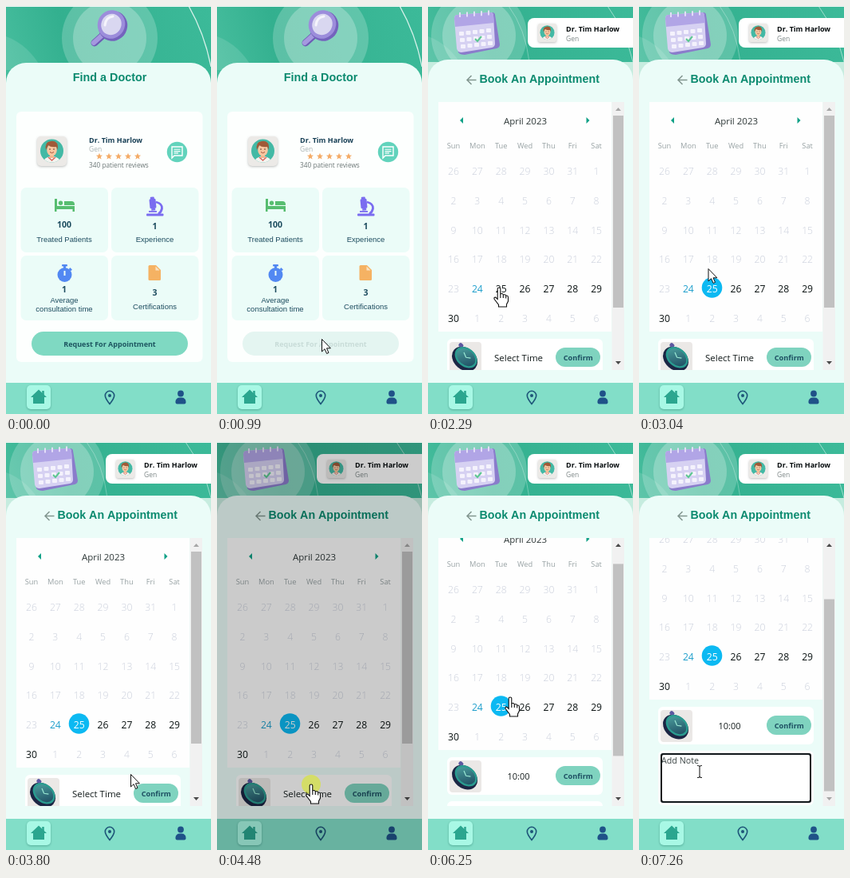
An HTML page with a canvas that plays this animation: 257x510 px, repeating every 8 s.

```html
<!DOCTYPE html>
<html lang="en">
<head>
<meta charset="utf-8">
<title>Doctor appointment</title>
<style>
html, body { margin: 0; width: 100%; height: 100%; overflow: hidden; background: #ebfcf8; }
canvas { display: block; width: 257px; height: 510px; }
</style>
</head>
<body>
<canvas id="stage"></canvas>
<script>
const W = 257, H = 510, LOOP = 8000;
const canvas = document.getElementById('stage');
const dpr = window.devicePixelRatio || 1;
canvas.width = W * dpr;
canvas.height = H * dpr;
const c = canvas.getContext('2d');

const SANS = '"Open Sans", "Noto Sans", sans-serif';
const ARIAL = '"Liberation Sans", Arial, sans-serif';
const MINT = '#ebfcf8', INK = '#1d4c5f', TEAL = '#0b8a6f';
const DOCTOR = 'Dr. Tim Harlow';

// ---- drawing helpers ----
function box(x, y, w, h, r, fill) {
  c.beginPath();
  c.roundRect(x, y, w, h, r);
  c.fillStyle = fill;
  c.fill();
}
function disc(x, y, r, fill) {
  c.beginPath();
  c.arc(x, y, r, 0, Math.PI * 2);
  c.fillStyle = fill;
  c.fill();
}
function oval(x, y, rx, ry, turn, fill) {
  c.beginPath();
  c.ellipse(x, y, rx, ry, turn, 0, Math.PI * 2);
  c.fillStyle = fill;
  c.fill();
}
function shape(d, fill, stroke, width = 1) {
  const p = new Path2D(d);
  if (fill) { c.fillStyle = fill; c.fill(p); }
  if (stroke) { c.strokeStyle = stroke; c.lineWidth = width; c.stroke(p); }
}
function text(s, x, y, font, fill, align = 'center') {
  c.font = font;
  c.textAlign = align;
  c.fillStyle = fill;
  c.fillText(s, x, y);
}
function at(x, y, scale, draw) {
  c.save();
  c.translate(x, y);
  c.scale(scale, scale);
  draw();
  c.restore();
}
function shadowed(color, blur, dy, draw) {
  c.save();
  c.shadowColor = color;
  c.shadowBlur = blur * dpr;
  c.shadowOffsetY = dy * dpr;
  draw();
  c.restore();
}

// ---- shared parts ----
function header(cx, cy) {
  const g = c.createLinearGradient(0, 70, W, 0);
  g.addColorStop(0, '#46bd9d');
  g.addColorStop(0.3, '#33b08f');
  g.addColorStop(1, '#3cba99');
  c.fillStyle = g;
  c.fillRect(0, 0, W, 100);
  shape('M0 38Q28 48 46 80H0Z', 'rgba(255,255,255,.12)');
  disc(cx, cy, 60, 'rgba(255,255,255,.2)');
  disc(cx, cy, 46, 'rgba(255,255,255,.24)');
}
function sheet(y) {
  box(0, y, W, H - y + 30, 25, MINT);
}
function avatar(x, y, size) {
  at(x, y, size / 37, () => {
    shadowed('rgba(0,0,0,.25)', 3, 1, () => box(0, 0, 37, 37, 5, '#eceae7'));
    disc(18.5, 18, 14.5, '#43b9a5');
    c.save();
    c.beginPath();
    c.arc(18.5, 18, 14.5, 0, Math.PI * 2);
    c.clip();
    oval(18.5, 33, 11, 8, 0, '#f4f4f0');
    c.fillStyle = '#f2b48c';
    c.fillRect(16, 21, 5, 6);
    oval(18.5, 17, 6.3, 7.4, 0, '#f8c6a0');
    shape('M11 17Q9 7 17 6Q27 4 26 17L24 13Q17 14 14 11Z', '#a05a38');
    shape('M16 19.5Q18.5 22 21 19.5', null, '#a4513d', 1);
    disc(16, 16, 0.8, '#4a2d24');
    disc(21, 16, 0.8, '#4a2d24');
    shape('M14 26L18.5 30L23 26', null, '#d96b5f', 1.6);
    c.restore();
  });
}
function nav() {
  c.fillStyle = '#82dec8';
  c.fillRect(0, 471, W, 39);
  shadowed('rgba(20,100,85,.4)', 3, 1, () => box(26, 474, 30, 30, 5, '#a8f8e5'));
  shape('M41 479.5L51 489H48V497H34V489H31Z', '#2ba68f');
  shape('M46.5 481V486', null, '#2ba68f', 2.5);
  shape('M130 497.5C126 492.5 124.3 489.6 124.3 487A5.7 5.7 0 0 1 135.7 487C135.7 489.6 134 492.5 130 497.5Z', null, '#1d5478', 1.6);
  disc(130, 487, 2, '#1d5478');
  disc(219, 484.5, 3.9, '#1f5288');
  box(212.5, 489.5, 13, 8, [5, 5, 2, 2], '#1f5288');
}

// ---- profile page ----
function magnifier() {
  c.lineCap = 'round';
  shape('M121 37L111 46', null, '#6d5bb5', 9);
  shape('M120 37L110 46', null, '#a598df', 6);
  oval(134, 25, 18, 19, 0.5, '#7463bd');
  oval(132, 23, 17, 18, 0.5, '#9c8ddb');
  oval(132, 23, 12.5, 13.5, 0.5, '#d9d7f0');
  shape('M124 24Q125 14 134 13', null, '#f5f4fc', 3);
  c.lineCap = 'butt';
}
function star(x, y) {
  c.beginPath();
  for (let i = 0; i < 10; i++) {
    const a = i * Math.PI / 5 - Math.PI / 2, r = i % 2 ? 1.9 : 4.3;
    c.lineTo(x + r * Math.cos(a), y + r * Math.sin(a));
  }
  c.fillStyle = '#f4ac68';
  c.fill();
}
function bed() {
  shape('M61 241H64V250H86V257H83.5V254H63.5V257H61ZM73 244H82Q86 244 86 248V249H73Z', '#57bd70');
  disc(68.5, 246.3, 2.7, '#57bd70');
}
function microscope() {
  c.save();
  c.translate(184, 247);
  c.rotate(-0.1);
  box(-4, -6, 8, 12, 1.5, '#7a6cf0');
  box(-2.5, -8.5, 5, 3, 1, '#7a6cf0');
  box(-2.5, 6, 5, 2.5, 0, '#7a6cf0');
  c.restore();
  shape('M188 245Q196 247 195.5 253Q195 257 191 260', null, '#7a6cf0', 2.8);
  box(176, 259.5, 21.5, 3, 1, '#7a6cf0');
  box(179, 256, 10, 1.8, 0, '#7a6cf0');
}
function stopwatch() {
  disc(73.5, 336, 9, '#5288f2');
  box(70, 323, 7, 2.6, 1, '#5288f2');
  box(72, 324, 3, 5, 0, '#5288f2');
  shape('M79.5 328L82 330.5', null, '#5288f2', 2.5);
  shape('M73.5 331V337', null, MINT, 2);
}
function tile(x, y, num, numY, lines, lineY) {
  box(x, y, 109.5, 81, 7, MINT);
  const mid = x + 54.5;
  text(num, mid, numY, 'bold 10.5px ' + SANS, INK);
  lines.forEach((s, i) => text(s, mid, lineY + i * 11, '9.5px ' + ARIAL, INK));
}
function profile(t) {
  header(130, 40);
  shape('M229 0Q249 35 257 76', null, 'rgba(255,255,255,.8)', 1.3);
  magnifier();
  sheet(71);
  text('Find a Doctor', 130, 94, 'bold 14.4px ' + ARIAL, TEAL);
  box(13, 132, 233.5, 313, 6, '#fdfffe');
  avatar(39, 163, 37);
  text(DOCTOR, 104, 171, 'bold 9px ' + SANS, '#173f55', 'left');
  text('Gen', 104, 182, '8.5px ' + SANS, '#aab4b4', 'left');
  for (let i = 0; i < 5; i++) star(117 + i * 12, 188);
  text('340 patient reviews', 104, 202, '8.3px ' + SANS, '#6d7777', 'left');
  disc(214.5, 182.5, 12.7, '#62d3bc');
  shape('M208 176H221V187H211L208 190Z', null, '#fff', 1.4);
  shape('M210.5 179.3H218.5M210.5 181.6H218.5M210.5 183.9H216', null, '#fff', 1.1);
  tile(18.5, 227, '100', 277, ['Treated Patients'], 295);
  tile(132, 227, '1', 279, ['Experience'], 295);
  tile(18.5, 312, '1', 358, ['Average', 'consultation time'], 371);
  tile(132, 312, '3', 362, ['Certifications'], 379);
  bed();
  microscope();
  stopwatch();
  shape('M180 324H188L194 330V341.5Q194 343 192.5 343H180Q178.5 343 178.5 341.5V325.5Q178.5 324 180 324Z', '#f5b263');
  shape('M187.5 325.5V330.5H192.5Z', '#fbe3c2');
  const off = t >= 900;
  box(32, 407, 196, 30, 15, off ? '#e4f5f1' : '#7fd9c2');
  text('Request For Appointment', 130, 425.5, 'bold 9px ' + SANS, off ? '#c8dcd8' : '#1d5560');
}

// ---- booking page ----
function calendarIcon() {
  shape('M36 12L80 8Q84 8 84 11L90 48Q90 52 86 53L46 61Q40 61 38 58Z', '#8a7ccb');
  shape('M37 11L78 8Q82 8 82 12L84 47Q84 51 80 52L42 58Q37 58 36 53L33 16Q33 11 37 11Z', '#d6d1f2');
  shape('M37 11L78 8Q82 8 82 12L83 21L34 26L33 16Q33 11 37 11Z', '#b1a5e6');
  for (let i = 0; i < 5; i++) {
    const x = 40 + i * 9, y = 8 - i * 0.6;
    shape(`M${x} ${y + 6}V${y}`, null, '#e3ddf8', 2);
  }
  for (let r = 0; r < 3; r++) {
    for (let i = 0; i < 5; i++) box(39 + i * 8.5 + r, 32 + r * 8 - i, 6, 5, 1, '#f4f2fc');
  }
  shape('M59 41L62 44L67 38', null, '#5cc791', 2);
}
function scrollArrow(x, y, dir, live) {
  shape(`M${x - 3.5} ${y + 2 * dir}H${x + 3.5}L${x} ${y - 2 * dir}Z`, live ? '#4a4a4a' : '#a6a6a6');
}
function clock(x, y) {
  box(x, y, 40, 40, 4, '#ebe8e6');
  c.save();
  c.translate(x + 20, y + 20);
  c.rotate(0.7);
  oval(0, 1.5, 17.5, 13.5, 0, '#1c2644');
  box(-17.5, -11, 6, 5, 2, '#5d58a0');
  oval(0, -1, 15.5, 11.5, 0, '#2a9c90');
  const g = c.createLinearGradient(-12, -8, 12, 8);
  g.addColorStop(0, '#4a9d9c');
  g.addColorStop(1, '#1d4a60');
  oval(0, -1, 13, 9.3, 0, g);
  shape('M0 -1L-6 -4M0 -1L5 -4', null, '#9ae8d3', 1.2);
  c.restore();
}
function dayColor(n, picked) {
  if (n === 24) return '#1f9fcc';
  if (n === 25 && picked) return '#fff';
  return n > 24 && n < 31 ? '#0c1414' : '#cbd0dc';
}
function calendar(picked) {
  c.fillStyle = '#fefefe';
  c.fillRect(13, 120, 217, 287);
  text('April 2023', 122, 147.5, '11.5px ' + SANS, '#2e3838');
  shape('M44 139V147L40 143ZM198.5 139V147L202.5 143Z', '#11a187');
  const col = i => 32 + i * 29.85;
  ['Sun', 'Mon', 'Tue', 'Wed', 'Thu', 'Fri', 'Sat'].forEach((d, i) =>
    text(d, col(i), 178, '9.3px ' + SANS, '#98a2a4'));
  if (picked) disc(91.5, 352, 12.8, '#0cb9f2');
  for (let i = 0; i < 42; i++) {
    const n = i - 5, row = Math.floor(i / 7);
    const label = n < 1 ? n + 31 : n > 30 ? n - 30 : n;
    const weight = n > 23 && n < 31 ? 400 : 300;
    text(label, col(i % 7), 211 + row * 36.75, weight + ' 12.2px ' + SANS, dayColor(n, picked));
  }
}
function booking(t) {
  const scroll = t < 6250 ? 0 : t < 6320 ? 22 : 85;
  const chosen = t >= 5770;
  header(64, 37);
  shape('M101 0Q122 28 127 70', null, 'rgba(255,255,255,.3)');
  shape('M225 0Q248 32 257 70', null, 'rgba(255,255,255,.5)');
  calendarIcon();
  c.fillStyle = '#c6ecdf';
  c.fillRect(0, 70, W, 30);
  box(125, 15, 140, 37, 8, '#fff');
  avatar(138, 22, 23);
  text(DOCTOR, 173, 32, 'bold 9px ' + SANS, '#060c0e', 'left');
  text('Gen', 173, 44, '8.5px ' + SANS, '#7d8787', 'left');
  sheet(67);
  shape('M60.5 92.5H49M54.5 87L49 92.5L54.5 98', null, '#82968f', 1.5);
  text('Book An Appointment', 64.5, 96, 'bold 14.25px ' + ARIAL, TEAL, 'left');

  c.save();
  c.beginPath();
  c.rect(13, 120, 233, 335);
  c.clip();
  c.save();
  c.translate(0, -scroll);
  calendar(t >= 2690);
  box(24, 416, 195, 47, 6, '#fff');
  clock(27, 420);
  text(chosen ? '10:00' : 'Select Time', 113.5, 443.7, (chosen ? '11px ' : '11.5px ') + SANS, '#141c1c');
  box(160, 427, 56, 24, 12, '#7fd3bf');
  text('Confirm', 188.3, 443, 'bold 9.2px ' + SANS, '#1d4f62');
  box(24, 471, 195, 68, 6, '#fff');
  const focus = t >= 7060;
  box(27, 474, 189, 62, 3, focus ? '#10171a' : '#fff');
  box(29, 476, 185, 58, 2, '#fff');
  text('Add Note', 28, 487, '10.7px ' + SANS, focus ? '#3c4545' : '#6b7575', 'left');
  c.restore();
  c.fillStyle = '#f1f1f1';
  c.fillRect(230.5, 120, 15.5, 335);
  c.fillStyle = '#c1c1c1';
  c.fillRect(232, 137 + scroll * 0.7, 13, 240);
  scrollArrow(238.5, 129, 1, scroll > 0);
  scrollArrow(238.5, 446, -1, scroll < 85);
  c.restore();
}
function timeMenu(t) {
  c.save();
  c.beginPath();
  c.roundRect(67, 222, 93, 204, 6);
  c.clip();
  c.fillStyle = '#f4f4f4';
  c.fillRect(67, 222, 93, 204);
  [9, 10, 11, 12, 14, 15, 16].forEach((h, i) => {
    const y = 222 + i * 29;
    c.fillStyle = i === 1 && t >= 5170 ? '#80dcc6' : '#5ed3b9';
    c.fillRect(67, y, 76, 28);
    c.fillStyle = '#fff';
    c.fillRect(67, y + 28, 76, 1);
    text(h + ':00', 105, y + 19.5, '600 13px ' + SANS, '#fff');
  });
  c.fillStyle = '#c1c1c1';
  c.fillRect(145, 239, 13, 149);
  scrollArrow(151.5, 231, 1, false);
  scrollArrow(151.5, 417, -1, true);
  c.restore();
}

// ---- pointer ----
const START = [258, 438];
// start, end, steps, x, y, kind
const MOVES = [
  [260, 750, 6, 131, 416, 'hand'],
  [900, 900, 1, 131, 416, 'arrow'],
  [1190, 1550, 6, 152, 396, 'arrow'],
  [1600, 1940, 6, 128, 357, 'hand'],
  [2010, 2290, 5, 89, 352, 'hand'],
  [2850, 3260, 6, 84, 304, 'arrow'],
  [3400, 3800, 6, 156, 415, 'arrow'],
  [3870, 4010, 3, 130, 419, 'hand'],
  [4210, 4280, 2, 120, 419, 'hand'],
  [4480, 4480, 1, 118, 428, 'hand'],
  [4690, 5030, 6, 100, 273, 'hand'],
  [5170, 5300, 3, 100, 267, 'hand'],
  [5970, 5970, 1, 103, 319, 'hand'],
  [6650, 6780, 3, 84, 384, 'arrow'],
  [6840, 6840, 1, 76, 412, 'beam']
];
const CLICKS = [[750, 900], [2490, 2690], [4480, 4690], [5430, 5770], [7060, 7260]];

function pointerAt(t) {
  let [x, y] = START, kind = '';
  for (const [t0, t1, n, nx, ny, k] of MOVES) {
    if (t < t0) break;
    const step = n === 1 || t >= t1 ? n : Math.floor((t - t0) / (t1 - t0) * (n - 1)) + 1;
    const f = step / n, e = f * f * (3 - 2 * f);
    x += (nx - x) * e;
    y += (ny - y) * e;
    kind = k;
  }
  return { x, y, kind };
}
const POINTERS = {
  arrow: () => shape('M.5 .5V16L4 12.7L6.6 18.5L9 17.4L6.5 11.8H11.4Z', '#fff', '#111', 1),
  hand: () => shape('M-1.8 1.5Q-1.8 0 0 0Q1.8 0 1.8 1.5V8Q4.5 6.5 5.3 9Q8 8 8.7 10.2Q11.5 9.5 11.5 12.3V17L9.5 21V24H-.5V21.5L-5.8 14.5Q-6.8 12 -4.3 12L-1.8 14.5ZM5.3 9V13M8.7 10.2V13.5M1.8 8V13', '#fff', '#111', 1.1),
  beam: () => shape('M-3 -7.5Q0 -7.5 0 -6Q0 -7.5 3 -7.5M0 -6V6M-3 7.5Q0 7.5 0 6Q0 7.5 3 7.5', null, '#222', 1.1)
};
function pointer(t) {
  const p = pointerAt(t);
  if (!p.kind) return;
  if (CLICKS.some(([a, b]) => t >= a && t < b)) disc(p.x, p.y, 12, 'rgba(216,230,40,.62)');
  at(p.x, p.y, 1, POINTERS[p.kind]);
}

function render(t) {
  c.setTransform(dpr, 0, 0, dpr, 0, 0);
  c.clearRect(0, 0, W, H);
  if (t < 1060) profile(t);
  else booking(t);
  nav();
  c.fillStyle = '#f3faf8';
  c.fillRect(0, 0, W, 1);
  if (t >= 4480 && t < 5770) {
    c.fillStyle = `rgba(0,0,0,${t < 4550 ? 0.2 : 0.4})`;
    c.fillRect(0, 1, W, H);
    if (t >= 4550) timeMenu(t);
  }
  pointer(t);
}
const begin = performance.now();
function tick() {
  render((performance.now() - begin) % LOOP);
  requestAnimationFrame(tick);
}
tick();
</script>
</body>
</html>
```
